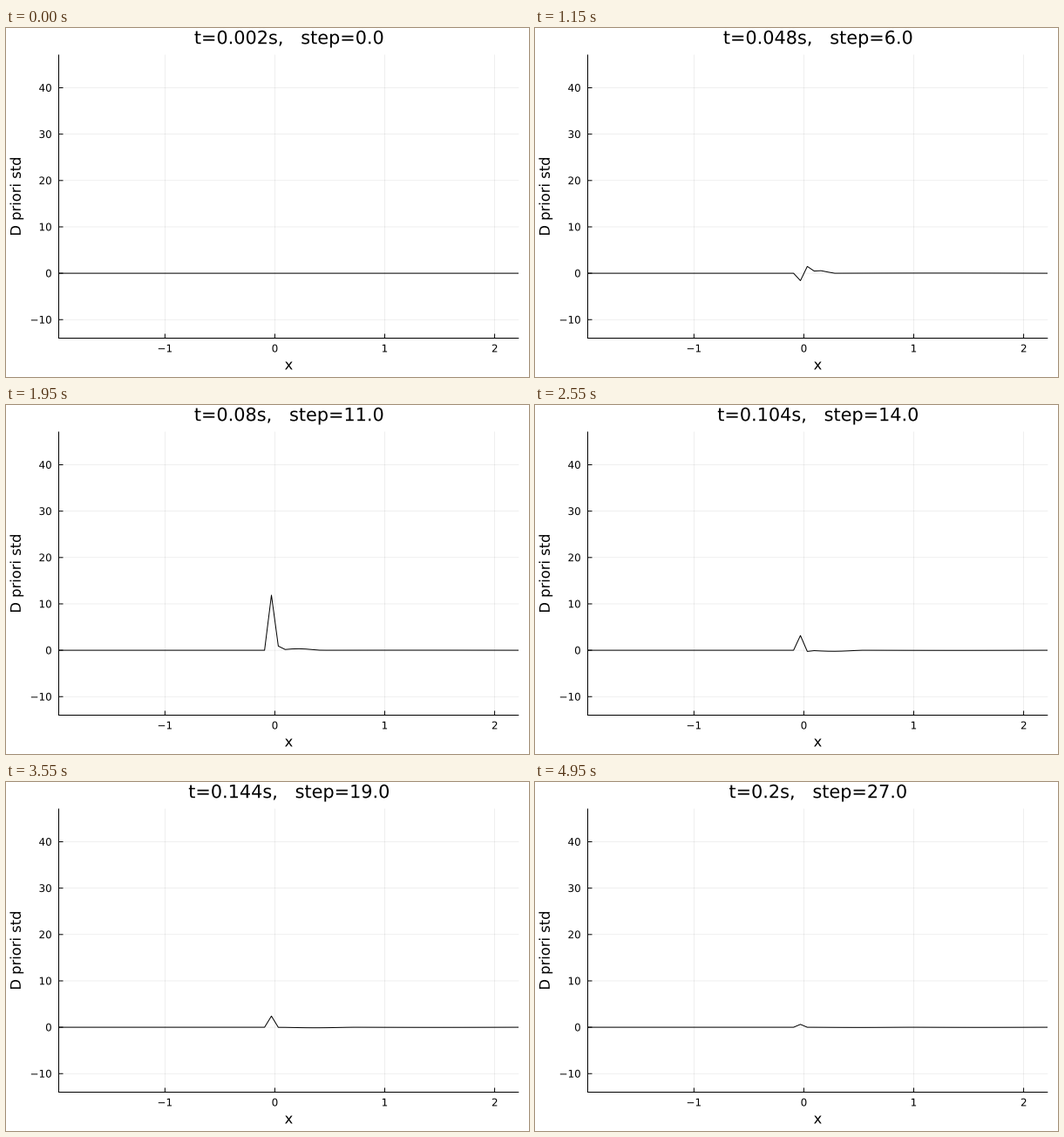
These frames come from a looping animation (600x400 px, 5000 ms). A matplotlib script:

```python
import numpy as np
import matplotlib.pyplot as plt
from matplotlib.animation import FuncAnimation
from matplotlib.patches import PathPatch
from matplotlib.textpath import TextPath
from matplotlib.transforms import Affine2D

W, H, DPI = 600, 400, 100
FRAMES, INTERVAL = 100, 50
LEFT, RIGHT, TOP, BOTTOM = 60.5, 588.3, 30.5, 355.5
MID_X, MID_Y = (LEFT + RIGHT) / 2, (TOP + BOTTOM) / 2
TITLE, GUIDE, TICK = 20.8, 16.3, 11.9     # font sizes in pixels

plt.rcParams["font.family"] = "DejaVu Sans"

fig = plt.figure(figsize=(W / DPI, H / DPI), dpi=DPI, facecolor="white")
ax = fig.add_axes([0, 0, 1, 1])
ax.set(xlim=(0, W), ylim=(H, 0))
ax.axis("off")


def px(x):
    return 308.45 + 126.07 * x


def py(y):
    return 281.1 - 5.315 * y


def stroke(x, y, width=1.0, **style):
    return ax.plot(x, y, color="black", lw=width * 72 / DPI, snap=False,
                   solid_capstyle="butt", **style)[0]


def text_path(x, y, text, size, align=0.5, angle=0):
    """Outline of text whose baseline point at share align sits on (x, y)."""
    path = TextPath((0, 0), text, size=size)
    box = path.get_extents()
    place = (Affine2D().translate(-box.x0 - align * box.width, 0)
             .scale(1, -1).rotate_deg(-angle).translate(x, y))
    return path.transformed(place)


def label(*args, **kwargs):
    return ax.add_patch(PathPatch(text_path(*args, **kwargs), lw=0,
                                  fc="black", snap=False))


def tick_text(v):
    return str(v).replace("-", "\u2212")


for v in range(-1, 3):
    x = px(v)
    stroke([x, x], [TOP, BOTTOM], 0.6, alpha=0.1)
    stroke([x, x], [BOTTOM, BOTTOM - 5])
    label(x, 371.4, tick_text(v), TICK)

for v in range(-10, 50, 10):
    y = py(v)
    stroke([LEFT, RIGHT], [y, y], 0.6, alpha=0.1)
    stroke([LEFT, LEFT + 5], [y, y])
    label(51.9, y + 4.35, tick_text(v), TICK, align=1)

stroke([LEFT, LEFT], [TOP, BOTTOM + 0.5])
stroke([LEFT, RIGHT], [BOTTOM, BOTTOM])
label(MID_X, 391.4, "x", GUIDE)
label(16.8, MID_Y, "D priori std", GUIDE, angle=90)
title = label(MID_X, 18.2, "t", TITLE)

# Cells sit half a step either side of zero
DX = 0.0625
xs = (np.arange(-32, 37) + 0.5) * DX
ZERO = 32                                 # first cell right of zero
FLIP = 35                                 # the spike changes sign here


def spike(i):
    """Runs towards a pole, flips sign, then dies away."""
    if i < FLIP:
        return -0.92 * i / (36.3 - i)
    return 41.7 * np.exp((FLIP - i) / 2.5) + 0.44 * np.sqrt(101 - i)


def profile(i, t):
    turn = np.clip((i - FLIP + 3) / 14, 0, 1)
    turn = turn * turn * (3 - 2 * turn)

    def swing(before, after):
        return before * (1 - turn) + after * turn

    wave = swing(0.025 * i, -0.22 * np.exp((51 - i) / 30))
    far = swing(0.0015 * i, -0.03)
    side = swing(0.025 * i ** 1.3, -0.25 * np.exp((51 - i) / 8))

    front = 0.045 + 4.75 * t
    near = np.clip(xs / front, 0, 1)
    beyond = np.clip((xs - front) / (2.2 - front), 0, 1)
    y = wave * np.abs(np.sin(np.pi * near)) ** 1.5
    y += far * np.sin(np.pi * beyond)
    y[ZERO - 1] = spike(i)
    y[ZERO] = side
    return y


curve = stroke([], [], solid_joinstyle="round")
curve.set_clip_path(plt.Rectangle((LEFT, TOP), RIGHT - LEFT, BOTTOM - TOP,
                                  transform=ax.transData))


def update(i):
    t = round(0.002 * (i + 1), 3)
    text = f"t={t}s,   step={round(t / 0.0075)}.0"
    title.set_path(text_path(MID_X, 18.2, text, TITLE))
    curve.set_data(px(xs), py(profile(i, t)))
    return title, curve


anim = FuncAnimation(fig, update, frames=FRAMES, interval=INTERVAL,
                     repeat=True, repeat_delay=0, blit=False)
plt.show()
```
